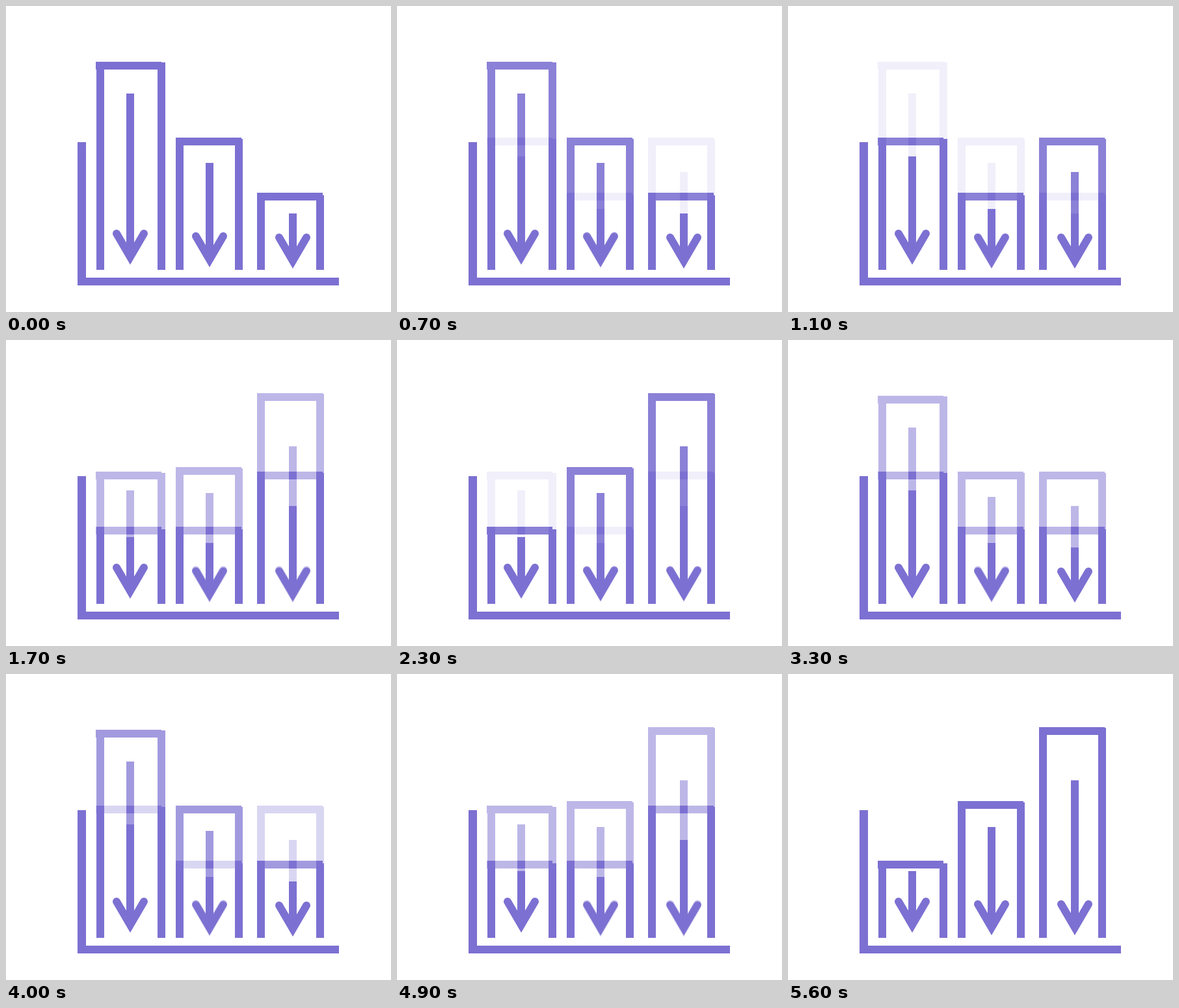
An HTML page with a canvas that plays this animation: 592 by 472 pixels, repeating every 5700 ms.

```html
<!DOCTYPE html>
<html lang="en">
<head>
<meta charset="utf-8">
<title>Bar chart crossfade</title>
<style>
  html, body { margin: 0; width: 100%; height: 100%; overflow: hidden; background: #fff; }
  canvas { display: block; }
</style>
</head>
<body>
<canvas id="stage" width="592" height="472"></canvas>
<script>
const COLOR = '#7c70d2';
const WIDTH = 592, HEIGHT = 472;
const LOOP = 5700, TICK = 100;
const FADE = 700, FADE_SPACING = 800, FIRST_FADE = 550;
const FLOOR = 407, THICK = 12;

// Fixed horizontal layout of each bar.
const columns = [
  { cap: 138, left: 139, right: 233, arrow: 191 },
  { cap: 261, left: 261, right: 352, arrow: 313 },
  { cap: 386, left: 386, right: 477, arrow: 441 }
];

// Per bar: top of cap, top of right post, top of arrow shaft, y of barb ends.
const poses = [
  [[86, 87, 135, 351], [203, 205, 242, 355], [288, 292, 320, 357]],
  [[203, 205, 232, 351], [288, 292, 313, 357], [203, 205, 256, 357]],
  [[288, 292, 304, 351], [196, 198, 236, 355], [82, 83, 164, 355]]
];
const order = [0, 1, 2, 1, 0, 1, 2];

function drawBar(ctx, { cap, left, right, arrow }, [top, postTop, shaftTop, barbY]) {
  ctx.fillRect(cap, top, 101, THICK);
  ctx.fillRect(left, top, THICK, FLOOR - top);
  ctx.fillRect(right, postTop, THICK, FLOOR - postTop);

  ctx.fillRect(arrow - THICK / 2, shaftTop, THICK, barbY + 32 - shaftTop);
  ctx.beginPath();
  ctx.moveTo(arrow - 21, barbY);
  ctx.lineTo(arrow, barbY + 36);
  ctx.lineTo(arrow + 21, barbY);
  ctx.stroke();
}

function renderLayer(pose) {
  const layer = document.createElement('canvas');
  layer.width = WIDTH;
  layer.height = HEIGHT;
  const ctx = layer.getContext('2d');
  ctx.fillStyle = ctx.strokeStyle = COLOR;
  ctx.lineWidth = THICK;
  ctx.lineCap = 'round';
  ctx.lineJoin = 'miter';
  columns.forEach((column, i) => drawBar(ctx, column, pose[i]));
  return layer;
}

const layers = poses.map(renderLayer);
const stage = document.getElementById('stage').getContext('2d');

function drawLayer(index, alpha) {
  stage.globalAlpha = alpha;
  stage.drawImage(layers[index], 0, 0);
}

const clamp = (v, lo, hi) => Math.min(hi, Math.max(lo, v));
const smooth = p => p * p * (3 - 2 * p);

function draw(time) {
  const t = Math.floor((time % LOOP) / TICK) * TICK - FIRST_FADE;
  const step = clamp(Math.floor(t / FADE_SPACING), 0, order.length - 2);
  const mix = smooth(clamp((t - step * FADE_SPACING) / FADE, 0, 1));

  stage.clearRect(0, 0, WIDTH, HEIGHT);
  // Additive blending keeps the parts shared by both poses solid.
  stage.globalCompositeOperation = 'lighter';
  drawLayer(order[step], 1 - mix);
  drawLayer(order[step + 1], mix);

  stage.globalCompositeOperation = 'source-over';
  stage.globalAlpha = 1;
  stage.fillStyle = COLOR;
  stage.fillRect(110, 210, 13, 221);
  stage.fillRect(110, 419, 402, THICK);
}

const start = performance.now();
function frame() {
  draw(performance.now() - start);
  requestAnimationFrame(frame);
}
frame();
</script>
</body>
</html>
```
